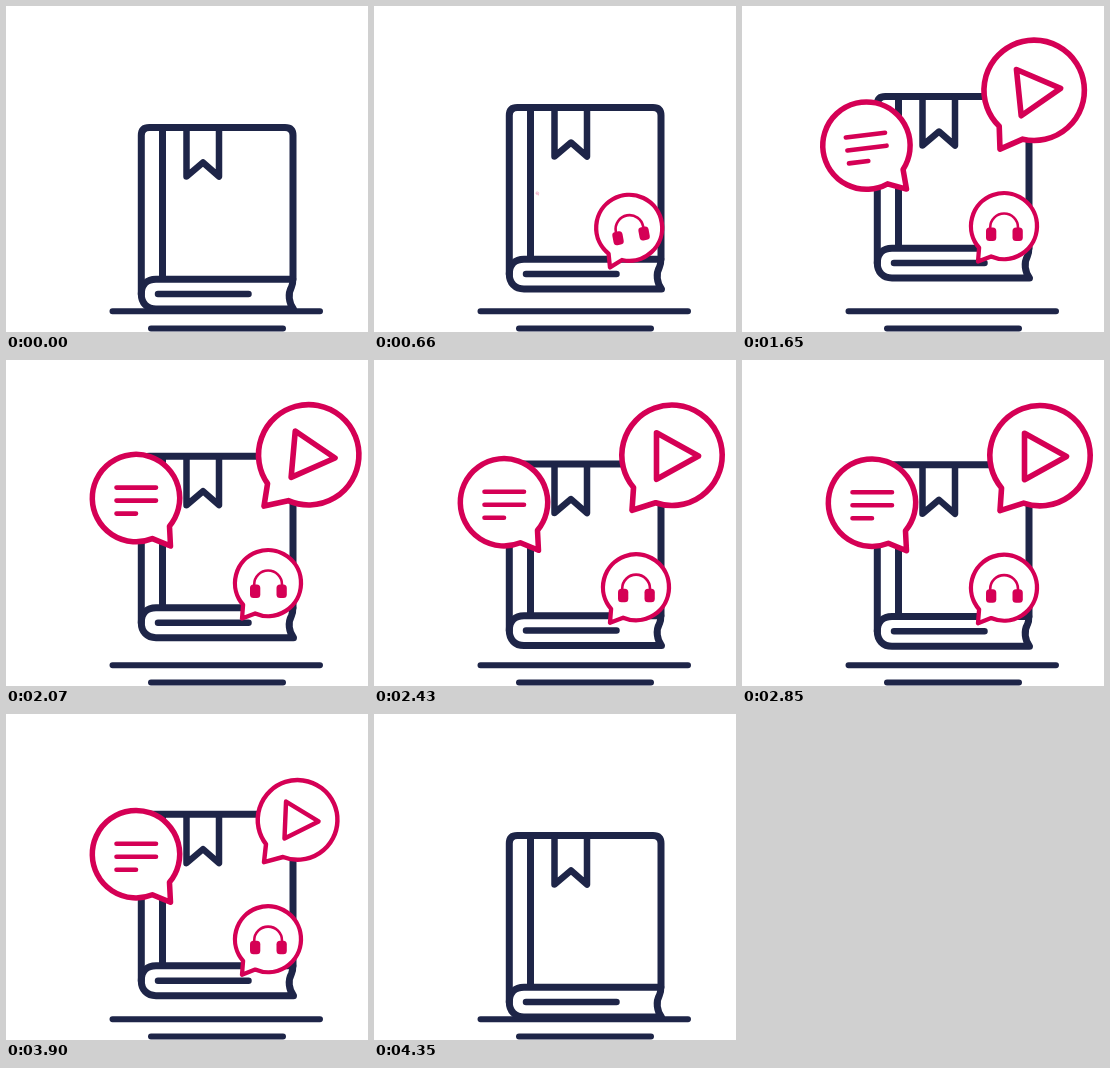
Animation of 362 by 326 pixels, one loop 4530 ms. Source, as an HTML page:

```html
<!DOCTYPE html>
<html lang="en">
<head>
<meta charset="utf-8">
<title>Book with speech bubbles</title>
<style>
  html, body { margin: 0; width: 100%; height: 100%; overflow: hidden; background: #fff; }
  svg { display: block; width: 100%; height: 100%; }
  path { fill: none; stroke-linecap: round; stroke-linejoin: round; }
  .navy { stroke: #1e2548; }
  .pink { stroke: #d50055; }
  path.paper { fill: #fff; }
</style>
</head>
<body>
<svg viewBox="0 0 362 326">
  <path class="navy" stroke-width="6" d="M106.500 305.200H314M145 322.500H277"/>
  <g id="book" class="navy" stroke-width="7">
    <path d="M150 303H287.500C283 297 281.500 288 285.500 281Q287 278 286.800 273.200H150C141 273.200 135.300 279 135.300 288S141 303 150 303Z"/>
    <path d="M135.300 288V129.500Q135.300 121.500 143.300 121.500H279Q287 121.500 287 129.500V273"/>
    <path d="M156.500 122V272"/>
    <path stroke-width="6.500" d="M180.500 122V170.500L197 156.500L213 170.500V122M152 288H242.500"/>
  </g>
  <g id="audio" class="pink">
    <path class="paper" stroke-width="4.300"/>
    <path stroke-width="2.600" d="M248.200 232V228.800A13.900 13.900 0 0 1 276 228.800V232"/>
    <g fill="#d50055" stroke="none">
      <rect x="244" y="229" width="10.300" height="13.500" rx="3.500"/>
      <rect x="270.500" y="229" width="10.300" height="13.500" rx="3.500"/>
    </g>
  </g>
  <g id="text" class="pink">
    <path class="paper" stroke-width="5.500"/>
    <path stroke-width="4.600" d="M110.500 132H150M110.500 145H150M110.500 158H130"/>
  </g>
  <g id="video" class="pink">
    <path class="paper" stroke-width="5.600"/>
    <path stroke-width="5.600" d="M282.500 73L324.500 96.300L282.500 119.500Z"/>
  </g>
</svg>
<script>
const LOOP = 4530, STEP = 30, END = 4350;
const $ = id => document.getElementById(id);
const clamp = x => Math.min(1, Math.max(0, x));
const smooth = x => (1 - Math.cos(Math.PI * clamp(x))) / 2;

// Circle centre and radius, tail tip, tail root angles, start time, exit time, swing side.
const bubbles = [
  { id: "audio", cx: 262, cy: 227.5, r: 33, tip: [236, 263], roots: [113, 139], start: 545, exit: 3990, side: 1 },
  { id: "text", cx: 130, cy: 142.5, r: 43.7, tip: [164.500, 190.500], roots: [40, 68], start: 850, exit: 3900, side: -1 },
  { id: "video", cx: 298, cy: 95.5, r: 50.2, tip: [258, 150.500], roots: [109, 140], start: 1165, exit: 3810, side: 1 }
];

for (const b of bubbles) {
  b.el = $(b.id);
  const [from, to] = b.roots.map(deg => {
    const a = deg * Math.PI / 180;
    return [b.cx + b.r * Math.cos(a), b.cy + b.r * Math.sin(a)];
  });
  b.el.querySelector(".paper").setAttribute("d",
    `M${to}A${b.r} ${b.r} 0 1 1 ${from}L${b.tip}Z`);
}

// Damped swing: time after start, angle in degrees.
const swing = [[-230, 0], [80, -12.5], [270, 13.5], [540, -8], [810, 7], [1080, 0]];

function swingAngle(t) {
  for (let i = 1; i < swing.length; i++) {
    const [t0, a0] = swing[i - 1], [t1, a1] = swing[i];
    if (t < t1) return a0 + (a1 - a0) * smooth((t - t0) / (t1 - t0));
  }
  return 0;
}

function bookLift(t) {
  if (t < 1480) return -31 * Math.sin(Math.PI / 2 * t / 1480);
  if (t < 2700) return -31 + 16 * smooth((t - 1640) / 1060);
  if (t < 3420) return -15 - 16 * smooth((t - 2700) / 720);
  return -31 * Math.cos(Math.PI / 2 * clamp((t - 3420) / (END - 3420)));
}

function draw(t) {
  const lift = bookLift(t);
  $("book").setAttribute("transform", `translate(0 ${lift})`);
  const dy = 0.53 * (lift + 17);
  for (const b of bubbles) {
    const age = t - b.start, out = clamp((t - b.exit) / 300);
    const scale = smooth((age + 230) / 340) * (1 - smooth(out));
    const angle = b.side * (swingAngle(age) + 3 * Math.sin(Math.PI * out));
    const [x, y] = b.tip;
    b.el.style.display = scale > 0.001 ? "" : "none";
    b.el.setAttribute("transform",
      `translate(${x} ${y + dy}) rotate(${angle}) scale(${scale}) translate(${-x} ${-y})`);
  }
}

const begin = performance.now();
function tick() {
  const t = (performance.now() - begin) % LOOP;
  draw(Math.min(END, Math.floor(t / STEP) * STEP));
  requestAnimationFrame(tick);
}
tick();
</script>
</body>
</html>
```
